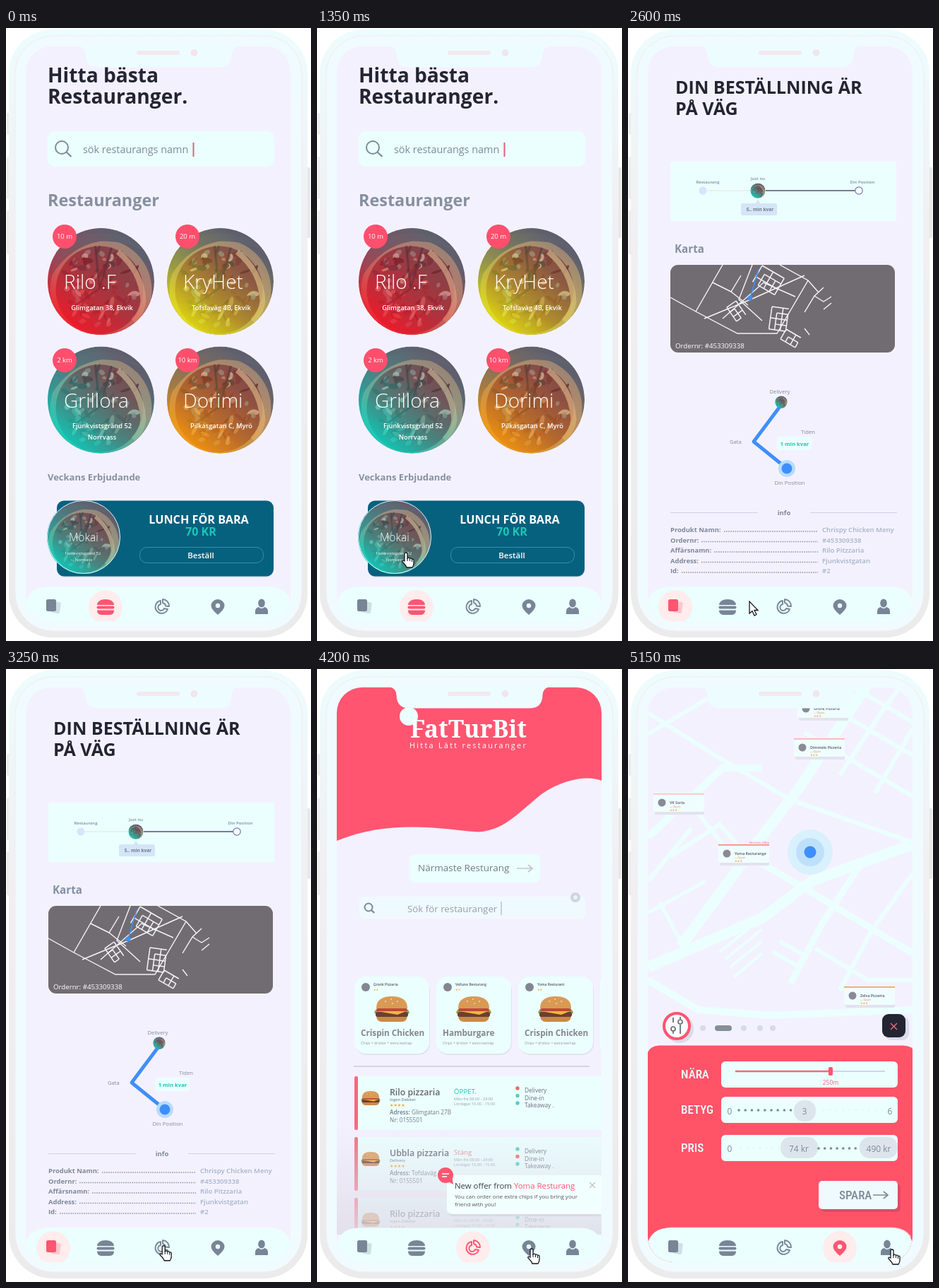
An HTML page that plays this animation: 432x867 px, repeating every 5.35 s.

```html
<!DOCTYPE html>
<html lang="sv">
<head>
<meta charset="utf-8">
<title>Restaurangapp</title>
<style>
html, body { margin: 0; width: 100%; height: 100%; overflow: hidden; background: #fff; }
svg { display: block; width: 432px; height: 867px; }
text { font-family: "Open Sans", "Noto Sans", sans-serif; white-space: pre; }
.logo { font-family: "Noto Serif", serif; }
.narrow { font-family: "Liberation Sans Narrow", "Roboto Condensed", "Open Sans", sans-serif; font-stretch: 75%; }
</style>
</head>
<body>
<svg id="stage" viewBox="0 0 432 867" xmlns="http://www.w3.org/2000/svg"></svg>
<script>
const PALE = '#ebffff', BACK = '#f4f1ff', PINK = '#ff5571', GREY = '#7f8a99', DARK = '#232533',
      TEAL = '#1cc6b8', BLUE = '#3f8ffb';
const LOOP = 5350, STEP = 50, LAST = 5150, FADE = 300;

let seed = 4711;
const rnd = (a, b) => {
  seed = (seed * 16807) % 2147483647;
  return +(a + (b - a) * seed / 2147483647).toFixed(1);
};
const pick = list => list[Math.floor(rnd(0, list.length - .1))];
const repeat = (n, make) => Array.from({ length: n }, (_, i) => make(i)).join('');

const text = (x, y, s, size, fill, weight = 400, anchor = 'start', more = '') =>
  `<text x="${x}" y="${y}" font-size="${size}" fill="${fill}" font-weight="${weight}" text-anchor="${anchor}" ${more}>${s}</text>`;
const mid = (x, y, s, size, fill, weight) => text(x, y, s, size, fill, weight, 'middle');
const rect = (x, y, w, h, r, fill, more = '') =>
  `<rect x="${x}" y="${y}" width="${w}" height="${h}" rx="${r}" fill="${fill}" ${more}/>`;
const dot = (x, y, r, fill, more = '') => `<circle cx="${x}" cy="${y}" r="${r}" fill="${fill}" ${more}/>`;
const line = (d, stroke, w = 1, more = '') =>
  `<path d="${d}" fill="none" stroke="${stroke}" stroke-width="${w}" ${more}/>`;
const shape = (d, fill, more = '') => `<path d="${d}" fill="${fill}" ${more}/>`;
const at = (x, y, body, scale = 1) => `<g transform="translate(${x} ${y}) scale(${scale})">${body}</g>`;

// Shared artwork
const tints = { red: '#ff1426', yellow: '#ecec08', teal: '#00d8c4', orange: '#ff9d06' };

const blob = () => {
  const a = rnd(0, 6.28), d = 56 * Math.sqrt(rnd(0, 1));
  const x = (2 + d * Math.cos(a)).toFixed(1), y = (8 + d * Math.sin(a)).toFixed(1);
  const tone = pick(['#5c2630', '#742f38', '#8f3a40', '#b98272', '#c9b3a6', '#8f8587', '#4f3a42']);
  return `<ellipse cx="${x}" cy="${y}" rx="${rnd(3, 9)}" ry="${rnd(1.5, 4)}" fill="${tone}" transform="rotate(${rnd(-80, 80)} ${x} ${y})" opacity=".8"/>`;
};
const pizza = () => dot(0, 0, 75.5, '#5f606e') +
  dot(0, 12, 72, '#a58a78') + dot(-2, 12, 62, '#7f444a') +
  repeat(90, blob) +
  line('M-8 -50L-2 10M15 -48L-2 10L-45 40', '#43343c', 3, 'opacity=".7"') +
  line('M24 -42Q58 -14 60 28Q58 44 46 56', '#d0b08c', 8, 'opacity=".75"') +
  shape('M-64 -42Q0 -96 64 -42Q40 -57 0 -57Q-44 -50 -70 -8Z', '#62636f');

const dish = (x, y, tint, scale = 1) => at(x, y, '<use href="#pizza"/>' + dot(0, 0, 75.5, `url(#${tint})`), scale);

const burger = (x, y, scale) => at(x, y,
  shape('M-22 10H22Q21 18 14 18H-14Q-21 18 -22 10Z', '#c98a4b') +
  shape('M-25 5Q-18 12 -8 7Q2 13 12 7Q20 12 25 5L23 1H-23Z', '#8fa04a') +
  rect(-23, 4, 46, 7, 3, '#6b3f30') + shape('M-20 3H20L8 8Z', '#f2b53d') +
  rect(-22, -1, 44, 4, 2, '#bf4a38') +
  shape('M-22 -1Q-22 -18 0 -18Q22 -18 22 -1Z', '#d99a55') +
  line('M-10 -11h2M-2 -14h2M7 -11h2M0 -8h2', '#f3d9a9', 1.5), scale);

const lens = (x, y, r) =>
  dot(x, y, r, 'none', `stroke="${GREY}" stroke-width="2"`) +
  line(`M${x + r * .7} ${y + r * .7}L${x + r * 1.5} ${y + r * 1.45}`, GREY, 2.2);

const arrow = (x, y, len, color) => line(`M${x} ${y}h${len}m-6 -5l6 5l-6 5`, color, 1.7);
const stars = (x, y, n, size) => text(x, y, '★'.repeat(n), size, '#f6a623');

const icons = [
  c => rect(-3, -8, 13, 16, 2, c, 'opacity=".25" transform="rotate(8)"') + rect(-10, -11, 14, 17, 2.5, c),
  c => shape('M-12 -3Q-11 -11 0 -11Q11 -11 12 -3Z', c) + rect(-12.5, -1.5, 25, 4, 2, c) +
       shape('M-12 4.5H12Q12 11 6 11H-6Q-12 11 -12 4.5Z', c),
  c => line('M-2 -9A9 9 0 1 0 8 3L3 2A4.500 4.500 0 1 1 -2 -4Z', c, 1.9, 'stroke-linejoin="round"') +
       line('M1 -11A9.500 9.500 0 0 1 10 -1L5 -1.500A5 5 0 0 0 1 -6Z', c, 1.9, 'stroke-linejoin="round"'),
  c => shape('M0 11Q-9.500 3 -9.500 -2A9.500 9 0 0 1 9.500 -2Q9.500 3 0 11Z', c) + dot(0, -2, 3.2, PALE),
  c => `<ellipse cx="0" cy="-5.500" rx="4.800" ry="6" fill="${c}"/>` + shape('M-9 10V6Q-9 1 -4 0Q0 4 4 0Q9 1 9 6V10Z', c)
];
const nav = (active, personX = 362) =>
  shape('M28 839V812Q34 791 58 790.500H375Q398 792 403 812V839Z', PALE) +
  [67, 141, 221, 300, personX].map((x, i) =>
    (i === active ? dot(x, 819, 24, '#ffecec') : '') +
    at(x, 819, icons[i](i === active ? PINK : '#788596'))).join('');

const screen = (id, body) => `<g id="${id}">${rect(28, 26, 375, 813, 0, BACK)}${body}</g>`;

// Screens
const restaurant = (x, y, tint, name, distance, address, nameX, badgeX) => {
  const badgeY = y > 400 ? 470 : 295;
  return dish(x, y, tint) +
    dot(badgeX, badgeY, 17, '#ff4f6d') + mid(badgeX, badgeY + 3, distance, 9.5, '#fff') +
    text(nameX, y + 10.5, name, 28, '#fff', 300) +
    address.map((s, i) => mid(x + 1.5, y + 40 + i * 15.5, s, 9.3, '#fff', 600)).join('');
};

const home = () =>
  text(59, 77, 'Hitta bästa', 28.2, DARK, 700) + text(59, 107, 'Restauranger.', 28.2, DARK, 700) +
  rect(59, 146, 321, 50, 10, PALE) + lens(79, 169, 9) +
  text(109, 177, 'sök restaurangs namn', 14.4, GREY) + rect(264.5, 162, 2, 20, 0, '#e0607c') +
  text(59, 252, 'Restauranger', 23.4, '#85909f', 700) +
  restaurant(134.5, 358.5, 'red', 'Rilo .F', '10 m', ['Glimgatan 38, Ekvik'], 82, 83) +
  restaurant(303.5, 358.5, 'yellow', 'KryHet', '20 m', ['Tofslaväg 4B, Ekvik'], 251, 257) +
  restaurant(134.5, 526, 'teal', 'Grillora', '2 km', ['Fjunkvistsgränd 52', 'Norrvass'], 82, 83) +
  restaurant(303.5, 526, 'orange', 'Dorimi', '10 km', ['Pilkasgatan C, Myrö'], 251, 257) +
  text(59, 640, 'Veckans Erbjudande', 13, '#85909f', 700) +
  rect(73, 670, 306, 107, 10, '#d5dfea') + rect(72, 668.5, 307, 107, 10, '#06617f') +
  dish(110, 720, 'teal', .69) + dot(110, 720, 51.5, 'none', 'stroke="#d8f3f6" stroke-width="1"') +
  text(89, 726, 'Mokai', 15.5, '#fff', 300) +
  mid(109, 745, 'Fjunkvistsgränd 52', 5.8, '#fff') + mid(110, 754, 'Norrvass', 5.8, '#fff') +
  mid(273, 701, 'LUNCH FÖR BARA', 16.2, '#fff', 700) + mid(276, 718, '70 KR', 16, TEAL, 700) +
  rect(189.5, 734.5, 175, 22, 10, 'none', 'stroke="#3590a5"') + mid(276, 750, 'Beställ', 11.5, '#fff', 600) +
  nav(1);

const streets = (x, y, angle, cols, rows, size) =>
  `<g transform="translate(${x} ${y}) rotate(${angle})">` +
  repeat(cols + 1, i => line(`M${i * size} ${i % 2 * size}V${rows * size}`, '#f3f4fa', 1.5)) +
  repeat(rows + 1, i => line(`M${i % 2 * size} ${i * size}H${cols * size}`, '#f3f4fa', 1.5)) + '</g>';

const infoRow = ([label, dotsX, value], i) => {
  const y = 713 + i * 14.5;
  return text(60, y, label, 9.4, '#7c8796', 700) +
    line(`M${dotsX + 2} ${y - 1}H269`, '#8d97a5', 1.6, 'stroke-dasharray="1.6 1.5"') +
    text(275, y, value, 9.6, '#a3b3c6', 600);
};

const order = () =>
  text(67, 93, 'DIN BESTÄLLNING ÄR', 25.1, DARK, 700) + text(67, 123, 'PÅ VÄG', 25.1, DARK, 700) +
  rect(60, 189, 320, 84, 2, PALE) +
  line('M112 230H173', '#eee0da') + line('M195 230H322', '#55506c', 1.3) +
  dot(106, 230, 5.5, '#d7e4fa') + dot(327, 230, 5.2, '#f8fbff', 'stroke="#7576b3" stroke-width="1.2"') +
  dish(184, 230, 'teal', .14) +
  mid(113, 220, 'Restaurang', 6, GREY, 600) + mid(184, 215, 'Just nu', 6, GREY, 600) + mid(332, 220, 'Din Position', 6, GREY, 600) +
  shape('M180 249L184 243L188 249Z', '#d5e5f7') + rect(160, 248, 51, 17, 3, '#d5e5f7') +
  mid(187, 259, '5.. min kvar', 6.6, '#6e7b8d', 700) +
  text(66, 318, 'Karta', 15.2, '#8291a4', 700) +
  rect(60, 335, 318, 124, 11, '#716c71') +
  `<g clip-path="url(#mapClip)">` +
  line('M60 381L96 401L155 432H211L255 357L215 335M96 401L134 335M120 360L146 373L160 350M108 411L176 383L250 350M176 335L157 384L190 414M134 411L192 360L237 380M146 373L170 392M255 357L270 374M250 402L264 379L277 367M264 379l13 8l11 -7M277 398l11 -9M250 425l7 9', '#f3f4fa', 1.4) +
  streets(190, 336, 30, 4, 3, 9) + streets(204, 394, 8, 3, 4, 8) + streets(224, 426, 30, 3, 2, 8) + streets(153, 386, 55, 3, 2, 8) +
  line('M185 341L173 382', BLUE, 1.6) + dot(173, 382, 3.5, BLUE) + '</g>' +
  text(67, 453, 'Ordernr: #453309338', 9.7, '#fff') +
  mid(215, 517, 'Delivery', 7.7, GREY) +
  line('M217 533L178 585L225 623', BLUE, 5, 'stroke-linejoin="round"') + dish(217, 529, 'teal', .115) +
  dot(225, 623, 12, '#b7dcfb') + dot(225, 623, 7.5, BLUE) +
  text(144, 588, 'Gata', 7.7, GREY) + text(245, 574, 'Tiden', 7.7, GREY) +
  rect(211, 578, 49, 19, 4, PALE) + mid(236, 591, '1 min kvar', 7.7, TEAL, 700) +
  mid(229, 646, 'Din Position', 7.7, GREY) +
  line('M60 685.5H184M258 685.5H381', '#cfd3e2') + mid(221, 689, 'info', 9.5, '#7c8796', 700) +
  [['Produkt Namn:', 134, 'Chrispy Chicken Meny'], ['Ordernr:', 102, '#453309338'], ['Affärsnamn:', 120, 'Rilo Pitzzaria'],
   ['Address:', 102, 'Fjunkvistgatan'], ['Id:', 74, '#2']].map(infoRow).join('') +
  nav(0);

const foodCard = (x, place, food) =>
  rect(x + 1, 438, 106, 108, 16, '#e2e3ef') + rect(x, 435, 106, 109, 16, PALE) +
  dot(x + 16, 450, 6, '#85858f') + text(x + 27, 448, place, 5, '#55555f', 600) + stars(x + 27, 455, 2, 4) +
  burger(x + 53, 481, 1) + text(x + 9, 519, food, 11.7, '#858590', 700) +
  text(x + 9, 531, 'Chips + drickor + extra kechap', 5.2, '#92929c');

const listRow = (y, name, sub, address, open) =>
  rect(58, y, 345, 76, 0, PALE) + rect(53, y, 5, 76, 2, '#f9687f') + burger(76, y + 31, .55) +
  text(103, y + 26.5, name, 12.3, '#666670', 600) + text(103, y + 35, sub, 5.6, GREY, 600) + stars(103, y + 43, 4, 6) +
  text(103, y + 54, `<tspan font-weight="600">Adress:</tspan> ${address}`, 8.2, '#777783') +
  text(103, y + 64.5, 'Nr: 0155501', 8.2, '#777783') +
  text(194, y + 25, open ? 'ÖPPET.' : 'Stäng', 9.7, open ? TEAL : '#f08295') +
  text(194, y + 34, 'Mån-fre 08:00 - 24:00', 5.6, '#9b9ba5') + text(194, y + 41, 'Lördagar 10.00 - 15:00', 5.6, '#9b9ba5') +
  ['Delivery', 'Dine-in', 'Takeaway .'].map((s, i) =>
    dot(284, y + 17 + i * 10.5, 2.7, i === (open ? 0 : 1) ? '#e0705f' : '#56cfc0') +
    text(294, y + 23 + i * 10.5, s, 8.3, '#6e6e79')).join('');

const nearby = () =>
  shape('M28 26H403V158C385 150 346 155 313 181C282 207 262 229 228 230.5C180 227 105 211 28 243Z', PINK) +
  dot(130, 67, 13, PALE) +
  text(132, 97, 'FatTurBit', 34, '#fff', 900, 'start', 'class="logo"') +
  text(131, 112, 'Hitta Lätt restauranger', 10.8, '#fff', 400, 'start', 'letter-spacing="2.3"') +
  rect(131, 262, 185, 40, 8, PALE) + text(143, 286, 'Närmaste Resturang', 13.5, '#777984') + arrow(283, 282, 22, '#c9c3cd') +
  rect(60, 322, 320, 31, 7, '#effaff') + dot(366, 323, 7, '#ccd6e0') + dot(366, 323, 3, '#eaf2f7') +
  lens(73, 337, 5.5) + text(128, 344, 'Sök för restauranger', 13.3, '#9c9da7') + rect(260.5, 329, 1, 19, 0, '#a5a5b0') +
  foodCard(53, 'Gronk Pizzaria', 'Crispin Chicken') + foodCard(169, 'Velluno Resturang', 'Hamburgare') +
  foodCard(285, 'Yoma Resturant', 'Crispin Chicken') + rect(401, 435, 60, 109, 10, PALE) +
  line('M52 562H386', '#cfcbd9', 1.7) +
  listRow(576, 'Rilo pizzaria', 'Ingen Debiter', 'Glimgatan 27B', true) +
  listRow(662, 'Ubbla pizzaria', 'Delivery', 'Tofslaväg 31', false) +
  listRow(748, 'Rilo pizzaria', 'Ingen Debiter', 'Glimgatan 27B', true) +
  rect(28, 640, 375, 160, 0, 'url(#veil)') +
  rect(185, 719, 220, 55, 8, '#d9d9e5') + shape('M184 716H403V771H192Q184 771 184 763Z', '#f2ffff') +
  text(195, 735, `New offer from <tspan fill="${PINK}">Yoma Resturang</tspan>`, 11.4, '#3d3d49') +
  text(195, 749, 'You can order one extra chips if you bring your', 8, '#555560') + text(195, 760, 'friend with you!', 8, '#555560') +
  line('M386 726l8 8m0 -8l-8 8', '#c3c3cc', 1.3) +
  dot(182, 716, 11, PINK) + shape('M184 724L193 729L191 718Z', PINK) + line('M177 714h10M177 718h7', '#fff', 1.6) +
  nav(2);

const pin = (x, y, name, color) =>
  rect(x + 2, y + 4, 70, 25, 2, '#e3e2ef') + rect(x, y, 72, 25, 2, '#f0fdff') + rect(x, y - 1, 72, 1.7, 0, color) +
  dot(x + 12, y + 12, 5.5, '#8a8a94') + text(x + 23, y + 14, name, 5.3, '#555560', 600) +
  text(x + 23, y + 19, '— Öppet', 3.6, '#e08080') + stars(x + 23, y + 24, 3, 4);

const narrow = (x, y, s, fill) => text(x, y, s, 17, fill, 500, 'start', 'class="narrow"');
const valueBox = (y, label) => rect(132, y, 250, 37, 6, PALE) + narrow(75, y + 24, label, PALE);
const beads = (x, y, n, gap, r, fill) => repeat(n, i => dot(x + i * gap, y, r, fill));
const value = (x, y, s) => mid(x, y, s, 12, GREY);

const map = () =>
  [['M28 422L190 352L260 300L403 248', 15], ['M75 392L190 236L245 165L340 20', 15], ['M28 238L134 140L190 140', 10],
   ['M28 92L150 20M28 62L120 120L230 185L403 245', 6], ['M180 270L250 310L403 402', 9], ['M230 445L275 360L330 275', 9],
   ['M28 440L100 482L200 490L403 482', 10], ['M250 90L403 180M280 50L403 122M320 26L403 75', 6],
   ['M300 150L360 60L385 26M350 175L403 85', 6], ['M60 265L130 220L165 260M28 300L90 225M100 205L140 255', 6],
   ['M300 455L345 370L403 290M265 395L340 440L403 440', 6], ['M28 345L110 300M45 330L80 395', 5],
   ['M130 400L180 360M137 411L190 368M144 422L190 385M150 436L190 402', 4], ['M205 400L240 420M215 385L250 405', 6]]
    .map(([d, w]) => line(d, PALE, w)).join('') +
  dot(258, 259, 32, '#d9f0fd') + dot(258, 259, 20, '#bfe0fb') + dot(258, 259, 8.5, BLUE) +
  pin(240, 44, 'Gronk Pizzaria', '#ffb0ae') + pin(235, 99, 'Dimmelo Pizzeria', '#ffb0ae') + pin(36, 177, 'VK Sorla', '#ffc4c4') +
  text(172, 247, 'Normalt 290m', 4.2, PINK) + pin(128, 249, 'Yoma Resturange', '#f98a86') + pin(306, 450, 'Zelva Pizzeria', '#e2ad5b') +
  dot(73, 509, 20, '#dcdbe8') + dot(69, 505, 18, '#fafdff', `stroke="${PINK}" stroke-width="4"`) +
  line('M64 493V500M64 512V516M74 492V495M74 503V516', '#6d6d77', 1.8) +
  dot(64, 509, 3, 'none', 'stroke="#6d6d77" stroke-width="1.7"') + dot(74, 499, 3, 'none', 'stroke="#6d6d77" stroke-width="1.7"') +
  [106, 164, 187, 205].map(x => dot(x, 508, 4, '#d6dbe5')).join('') + rect(123, 504, 24, 8, 4, '#858f9b') +
  rect(364, 492, 34, 33, 9, '#dcdbe8') + rect(360, 488, 33, 33, 9, DARK) + line('M372 501l9 9m0 -9l-9 9', '#ff6575', 1.4) +
  shape('M28 839V542Q32 533 44 532.5H389Q400 533 403 537V839Z', '#ff5368') +
  valueBox(555, 'NÄRA') + line('M152 569H364', '#d5d4de', 2) + line('M152 569H287', '#fb6577', 2.4) +
  rect(284, 563, 6, 12, 2, '#f6586c') + mid(287, 588, '250m', 8.6, '#ee6578') +
  valueBox(605, 'BETYG') + value(144, 630, '0') + beads(157, 624, 9, 9.2, 1.8, '#7d8794') + beads(277, 624, 10, 9.2, .8, '#dbe4ec') +
  rect(235, 610, 31, 30, 14, '#dde5ec') + value(250, 630, '3') + value(371, 630, '6') +
  valueBox(659, 'PRIS') + value(144, 683, '0') + beads(160, 678, 7, 9, .8, '#dbe4ec') + rect(216, 662, 53, 30, 14, '#dde5ec') + value(242, 683, '74 kr') +
  beads(270, 678, 7, 8.7, 1.8, '#7d8794') + rect(328, 662, 54, 30, 14, '#dde5ec') + value(355, 683, '490 kr') +
  rect(273, 728, 113, 40, 6, '#dc4c63') + rect(270, 724, 112, 40, 5, '#effaff') +
  narrow(299, 750, 'SPARA', GREY) + arrow(347, 744, 21, GREY) +
  line('M32 812Q40 792 62 791H372Q392 791 400 804', '#ffb7c1', 3) +
  nav(3, 367);

const phone = () =>
  rect(1, 120, 5, 31, 2, '#ececec') + rect(1, 182, 5, 60, 2, '#ececec') + rect(1, 258, 5, 62, 2, '#ececec') + rect(426, 197, 5, 100, 2, '#e8e8e8') +
  rect(4, 2, 423, 860, 62, 'url(#body)') + rect(13, 11, 406, 842, 54, '#f0fbff', 'stroke="#f3eaf2"');
const notch = () =>
  shape('M103 25.5Q112 27 112.5 37Q113 55 130 55.5H302Q319 55 319.5 37Q320 27 329 25.5Z', '#edfdff') +
  rect(185, 32, 61, 6, 3, '#f2e9ef') + dot(266.5, 35, 5, '#f1e6ee');

const hand = shape('M4 12V2Q4 0 6 0Q8 0 8 2V8Q10 6 11.5 8.5Q13.5 7 14.5 9.5Q17 8.5 17 11V15Q17 18 15 21H7Q6 18 1 13Q0 10 4 12Z', '#fff',
  'stroke="#16161c" stroke-width="1.3"') + line('M8 8v4M11.5 9v3M14.5 10v3', '#16161c');
const pointer = shape('M0 0V17L4 13.5L7 20L10 18.5L7 12.5H12Z', '#fff', 'stroke="#16161c" stroke-width="1.3"');

const gradients = Object.entries(tints).map(([id, c]) =>
  `<linearGradient id="${id}" x1=".15" y1=".95" x2=".75" y2=".15"><stop offset="0" stop-color="${c}" stop-opacity=".95"/><stop offset=".4" stop-color="${c}" stop-opacity=".42"/><stop offset=".75" stop-color="${c}" stop-opacity=".12"/><stop offset="1" stop-color="#595968" stop-opacity=".15"/></linearGradient>`).join('');

const stage = document.getElementById('stage');
stage.innerHTML = `<defs>${gradients}
  <linearGradient id="body" x2="0" y2="1"><stop offset="0" stop-color="#edfcfd"/><stop offset=".35" stop-color="#f1eff1"/><stop offset="1" stop-color="#ebebeb"/></linearGradient>
  <linearGradient id="veil" x2="0" y2="1"><stop offset="0" stop-color="#e2dfea" stop-opacity="0"/><stop offset="1" stop-color="#dfdde8" stop-opacity=".85"/></linearGradient>
  <clipPath id="screenClip">${rect(28, 26, 375, 813, 36, '#fff')}</clipPath>
  <clipPath id="mapClip">${rect(60, 335, 318, 124, 11, '#fff')}</clipPath>
  <clipPath id="plate">${dot(0, 0, 75.5, '#fff')}</clipPath>
  <g id="pizza" clip-path="url(#plate)">${pizza()}</g></defs>` +
  phone() +
  `<g clip-path="url(#screenClip)">${screen('home', home())}${screen('order', order())}${screen('nearby', nearby())}${screen('map', map())}</g>` +
  notch() + `<g id="cursor"><g id="hand">${hand}</g><g id="pointer">${pointer}</g></g>`;

// Timing
const $ = id => document.getElementById(id);
const screens = [['home', -FADE], ['order', 2230], ['nearby', 3400], ['map', 4435]];
const path = [[1000, 150, 715], [1350, 120, 742], [1600, 118, 746], [2100, 72, 817], [2280, 72, 817], [2600, 172, 811],
  [2950, 215, 815], [3400, 218, 816], [3600, 292, 820], [4000, 298, 820], [4430, 298, 820], [4550, 308, 820], [5000, 368, 821], [5150, 368, 821]];
const pointerSpans = [[2230, 2900], [3400, 3700], [4435, 4850]];

const clamp = v => Math.min(1, Math.max(0, v));
const easeOut = v => 1 - (1 - v) ** 2;
const smooth = v => v * v * (3 - 2 * v);
const show = (id, on) => { $(id).style.display = on ? '' : 'none'; };

function cursorAt(t) {
  const i = Math.max(1, path.findIndex(p => p[0] >= t));
  const [t0, x0, y0] = path[i - 1], [t1, x1, y1] = path[i];
  const k = smooth(clamp((t - t0) / (t1 - t0)));
  return [x0 + (x1 - x0) * k, y0 + (y1 - y0) * k];
}

function render(time) {
  const t = Math.min(LAST, Math.floor(time % LOOP / STEP) * STEP);
  const opacity = screens.map(([, start]) => easeOut(clamp((t - start) / FADE)));
  screens.forEach(([id], i) => {
    $(id).setAttribute('opacity', opacity[i].toFixed(3));
    show(id, opacity[i] > 0 && opacity[i + 1] !== 1);
  });
  const plain = pointerSpans.some(([a, b]) => t >= a && t < b);
  show('cursor', t >= path[0][0]);
  $('cursor').setAttribute('transform', `translate(${cursorAt(t)})`);
  show('hand', !plain);
  show('pointer', plain);
}

const begin = performance.now();
function tick() {
  render(performance.now() - begin);
  requestAnimationFrame(tick);
}
tick();
</script>
</body>
</html>
```
